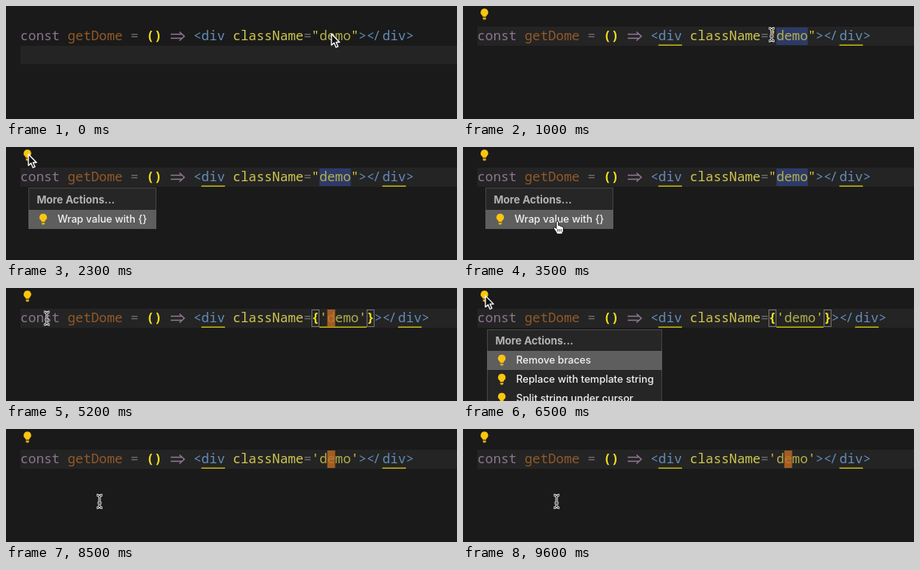
Animation, 564 px wide and 142 px high, one loop 9.7 s. Source, as an HTML page:

```html
<!DOCTYPE html>
<html lang="en">
<head>
<meta charset="utf-8">
<title>Quick fix menu</title>
<style>
html, body { margin: 0; width: 100%; height: 100%; overflow: hidden; background: #1a1a1a; }
svg { display: block; width: 564px; height: 142px; }
.code text { font: 500 16.4px "Noto Sans Mono", monospace; white-space: pre; }
.code .bold { font-weight: 700; }
.menu text { font: 500 12.7px Inter, sans-serif; fill: #f2f2f2; }
.menu .head { font-size: 13px; font-weight: 700; fill: #b4b4b4; }
</style>
</head>
<body>
<svg id="stage" viewBox="0 0 564 142">
  <defs>
    <g id="bulb">
      <path d="M0-6.3a4.7 4.7 0 0 1 2.9 8.4q-.8.8-.9 1.9h-4q-.1-1.1-.9-1.9a4.7 4.7 0 0 1 2.9-8.4z" fill="#fcc50f"/>
      <path d="M-2 5h4v1.6q-.4 1.1-1.3 1.1h-1.4q-.9 0-1.3-1.1z" fill="#dcab10"/>
    </g>
    <path id="arrow" d="M0 0v14.3l3.3-3 2.4 5.6 2.5-1.1-2.4-5.3h4.4z" fill="#111" stroke="#fff" stroke-width="1.3" stroke-linejoin="round"/>
    <g id="beam" fill="none">
      <path d="M-3.6-8q3.2 0 3.6 2.4v11.2q-.4 2.4-3.6 2.4M3.6-8q-3.2 0-3.6 2.4M0 5.6q.4 2.4 3.6 2.4M-2.4 2h4.8" stroke="#f4f4f4" stroke-width="2.9"/>
      <path d="M-3.4-8q3 0 3.4 2.4v11.2q-.4 2.4-3.4 2.4M3.4-8q-3 0-3.4 2.4M0 5.6q.4 2.4 3.4 2.4M-2 2h4" stroke="#222" stroke-width="1"/>
    </g>
    <g id="hand" stroke="#111" stroke-linejoin="round">
      <path d="M-1.3.7q1.3-1.5 2.6 0v5q1.6-.7 2.3.6 1.6-.5 2.2.8 1.8-.2 1.8 1.5v3.2q-.2 2-1.4 3.2v1.3h-6.8q-.2-1.6-1.6-3.2l-2.7-4.2q.3-2 2.2-.8l1.4 1.3z" fill="#fff"/>
      <path d="M.6 10v3.4M2.8 10v3.4M5 10v3.4" stroke-width=".8"/>
    </g>
  </defs>
</svg>
<script>
const NS = 'http://www.w3.org/2000/svg';
const LEFT = 18, CELL = 9.84, LOOP = 9700;
const stage = document.getElementById('stage');

function add(parent, tag, attrs = {}, text = '') {
  const el = document.createElementNS(NS, tag);
  for (const k in attrs) el.setAttribute(k, attrs[k]);
  el.textContent = text;
  parent.append(el);
  return el;
}
const group = cls => add(stage, 'g', { class: cls });
const rect = (g, x, y, width, height, fill) => add(g, 'rect', { x, y, width, height, fill });
const colX = col => LEFT + col * CELL;
const put = (g, col, text, fill, cls = '') => add(g, 'text', { x: colX(col), y: 43, fill, class: cls }, text);
const underline = (g, col, n) => rect(g, colX(col), 48.4, n * CELL, 1.6, '#b9ad12');

const C = {
  key: '#8d7691', name: '#935a28', dim: '#6e6e6e', paren: '#f6e31c',
  tag: '#638cba', attr: '#d2c84e', str: '#b3b04a', quote: '#e0c63a'
};

const oldLine = rect(stage, LEFT, 50, 546, 23, '#242424');
const newLine = rect(stage, LEFT, 26, 546, 24, '#242424');
const selection = rect(stage, colX(38), 27, 4 * CELL, 22, '#2d3a68');

const head = group('code');
put(head, 0, 'const', C.key);
put(head, 6, 'getDome', C.name);
put(head, 14, '=', C.dim);
put(head, 16, '()', C.paren, 'bold');
add(head, 'path', {
  d: 'M206 35.5h13.5M206 40.5h13.5M217 32.5l6 5.5-6 5.5',
  fill: 'none', stroke: C.key, 'stroke-width': 1.5
});
put(head, 22, '<div', C.tag);
put(head, 27, 'className', C.attr);
put(head, 36, '=', C.dim);

// The attribute value and everything after it
function tail(quote, braces) {
  const g = group('code'), q = braces ? 38 : 37, end = q + 6 + (braces ? 1 : 0);
  if (braces) {
    for (const col of [37, 44]) {
      add(g, 'rect', { x: colX(col) + .5, y: 27.5, width: CELL - 1, height: 21, fill: 'none', stroke: '#777' });
      put(g, col, col < 40 ? '{' : '}', C.paren, 'bold');
    }
    underline(g, 38, 6);
  }
  put(g, q, quote, C.quote);
  put(g, q + 1, 'demo', C.str);
  put(g, q + 5, quote, C.quote);
  put(g, end, '>', C.tag);
  put(g, end + 1, '<', C.tag);
  put(g, end + 1.8, '/', C.tag);
  put(g, end + 3, 'div>', C.tag);
  const marks = add(g, 'g');
  underline(marks, 23, 3);
  underline(marks, end + 3, 3);
  return { g, marks };
}
const double = tail('"'), braced = tail("'", true), single = tail("'");
const block = rect(stage, colX(39), 27, CELL, 22, '#bd6b24');
block.style.opacity = .82;

function menu(x, y, w, items) {
  const g = group('menu'), h = 28 + items.length * 24;
  add(g, 'rect', { x: x + .5, y: y + .5, width: w - 1, height: h - 1, fill: '#262626', stroke: '#454545' });
  add(g, 'text', { x: x + 10.5, y: 70.5, class: 'head' }, 'More Actions...');
  rect(g, x, 79, w, 24, '#5e5e5e');
  items.forEach((label, i) => {
    add(g, 'use', { href: '#bulb', x: x + 18.5, y: 90 + i * 24 });
    add(g, 'text', { x: x + 36.5, y: 95.3 + i * 24 }, label);
  });
  return g;
}
const wrapMenu = menu(28, 51, 160, ['Wrap value with {}']);
const braceMenu = menu(30, 52, 219, ['Remove braces', 'Replace with template string', 'Split string under cursor']);
const bulb = add(stage, 'use', { href: '#bulb', x: 26.8, y: 9.6 });
const pointer = add(stage, 'use');

// time, x, y, shape
const path = [
  [0, 407, 35, 'arrow'], [300, 407, 36, 'beam'], [700, 407, 37, 'beam'],
  [1000, 386, 36, 'beam'], [1200, 380, 36, 'beam'], [1700, 50, 20, 'arrow'],
  [1900, 28, 9, 'arrow'], [3000, 28, 9, 'arrow'], [3200, 70, 55, 'hand'],
  [3500, 118, 93, 'hand'], [3900, 118, 93, 'beam'], [5000, 118, 93, 'beam'],
  [5200, 51, 38, 'beam'], [5400, 28, 11, 'arrow'], [7000, 28, 9, 'arrow'],
  [7200, 65, 55, 'hand'], [7500, 114, 86, 'hand'], [8200, 114, 86, 'beam'],
  [8500, 117, 91, 'beam'], [LOOP, 117, 91, 'beam']
];

const show = (el, on) => { el.style.display = on ? '' : 'none'; };

function draw(now) {
  const t = Math.floor(now % LOOP / 100) * 100;
  const within = (a, b) => t >= a && t < b;

  show(oldLine, t < 400);
  show(newLine, t >= 400);
  show(selection, within(600, 3900));
  show(double.g, t < 3900);
  show(double.marks, t >= 700);
  show(braced.g, within(3900, 8200));
  show(single.g, t >= 8200);
  show(block, within(3900, 6000) || t >= 8200);
  show(bulb, t >= 800);
  show(wrapMenu, within(2100, 3900));
  show(braceMenu, within(6000, 8200));

  const i = path.findIndex(p => p[0] > t) - 1;
  const [t0, x0, y0, shape] = path[i], [t1, x1, y1] = path[i + 1];
  const k = (t - t0) / (t1 - t0);
  pointer.setAttribute('href', '#' + shape);
  pointer.setAttribute('transform', `translate(${x0 + (x1 - x0) * k} ${y0 + (y1 - y0) * k})`);
}

const start = performance.now();
function tick() {
  draw(performance.now() - start);
  requestAnimationFrame(tick);
}
tick();
</script>
</body>
</html>
```
